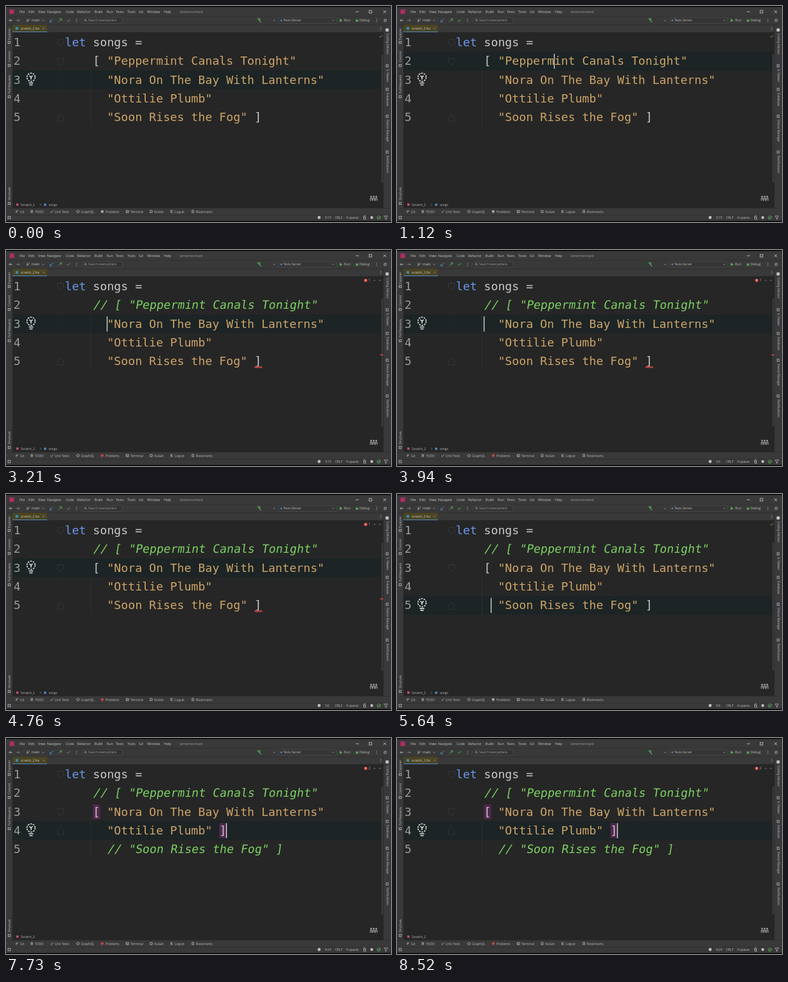
These frames come from a looping animation (600x338 px, 8560 ms). An HTML page:

```html
<!DOCTYPE html>
<html lang="en">
<head>
<meta charset="utf-8">
<title>Commenting out list items</title>
<style>
  html, body { margin: 0; width: 100%; height: 100%; overflow: hidden; background: #262626; }
  svg { display: block; width: 600px; height: 338px; }
  text { white-space: pre; font-family: "Open Sans", "Noto Sans", sans-serif; }
  .code { font-family: "DejaVu Sans Mono", "Noto Sans Mono", monospace; font-size: 18.17px; }
</style>
</head>
<body>
<svg viewBox="0 0 600 338"><g id="chrome"></g><g id="editor"></g></svg>
<script>
const LOOP = 8560, LEFT = 91.8, COL = 10.94, TOP = 42.4, ROW = 29.3;
const GREY = '#bcbcbc', DIM = '#8a8a8a', GREEN = '#57a65a', BLUE = '#4a88c7', RED = '#e04a46';
const PLAIN = '#c8c8c8', STRING = '#cda468', COMMENT = '#7bd162', KEYWORD = '#6c95eb';

const rect = (x, y, w, h, fill, more = '') =>
  `<rect x="${x}" y="${y}" width="${w}" height="${h}" fill="${fill}" ${more}/>`;
const dot = (x, y, r, fill) => `<circle cx="${x}" cy="${y}" r="${r}" fill="${fill}"/>`;
const ring = (x, y, r, color, width, more = '') =>
  `<circle cx="${x}" cy="${y}" r="${r}" fill="none" stroke="${color}" stroke-width="${width}" ${more}/>`;
const line = (d, color = GREY, width = .8, more = '') =>
  `<path d="${d}" fill="none" stroke="${color}" stroke-width="${width}" ${more}/>`;
const text = (x, y, s, size = 4.9, fill = GREY, more = '') =>
  `<text x="${x}" y="${y}" font-size="${size}" fill="${fill}" ${more}>${s}</text>`;
const frame = (x, y, color = GREY, s = 4) =>
  rect(x - s / 2, y - s / 2, s, s, 'none', `stroke="${color}" stroke-width=".8"`);
const chevron = (x, y, color = GREY) => line(`M${x - 1.5} ${y - .7}l1.5 1.5 1.5-1.5`, color, .6);
const check = (x, y, color = GREEN) => line(`M${x - 2} ${y}l1.5 1.7 3-3.6`, color, 1);
const dots = (x, y) => [-2, 0, 2].map(d => dot(x, y + d, .55, GREY)).join('');

const colX = c => LEFT + c * COL;
const rowY = r => TOP + (r - 1) * ROW;
const code = (r, c, s, fill, slant = 0) =>
  `<text class="code" fill="${fill}" transform="translate(${colX(c)} ${rowY(r) + 20.7}) skewX(${-slant})">${s}</text>`;
const squiggle = (r, c, w) => {
  let d = `M${colX(c)} ${rowY(r) + 25}`;
  for (let x = 0; x < w; x += 4) d += 'l2-2.4 2 2.4';
  return line(d, RED, 1.1);
};

function drawChrome() {
  const menu = [['File', 21], ['Edit', 35], ['View', 50], ['Navigate', 64], ['Code', 93], ['Refactor', 111],
    ['Build', 138], ['Run', 157], ['Tests', 171], ['Tools', 189], ['Git', 207], ['Window', 220], ['Help', 246]];
  // bottom tools: label, x, icon strokes around the icon centre
  const tools = [['Git', 22, 'm-1.2-2v4m2.4-4v1.4l-2.4 1.2'], ['TODO', 45, 'm-2-1.5h4m-4 1.5h4m-4 1.5h4'],
    ['Unit Tests', 76, 'm-2 0l1.5 1.7 3-3.6'], ['GraphQL', 117, 'm0-2l2 1v2l-2 1-2-1v-2z'], ['Problems', 155, ''],
    ['Terminal', 194, 'm-2-1.7h4v3.4h-4zm1 1l1 .8-1 .8'], ['NuGet', 231, 'm-1.7-1.7h3.4v3.4h-3.4z'],
    ['Logcat', 263, 'm-2-1.5h4m-4 1.5h2.5m-2.5 1.5h4'], ['Bookmarks', 296, 'm-1.3-2h2.6v4l-1.3-1-1.3 1z']];
  const left = [['Explorer', 53, 57], ['Commit', 88, 93], ['Pull Requests', 137, 142], ['Structure', 304, 309]];
  const right = [['Coding Advisor', 43], ['IL Viewer', 99], ['Database', 136], ['Device Manager', 178], ['Notifications', 234]];

  let s = rect(0, 0, 600, 338, '#393939') + rect(10, 41, 578, 275, '#262626');
  s += line('M0 16.2H600M0 29.3H600M0 316.5H600M0 327.5H600M10.3 29V316M588.3 29V316', '#2e2e2e', .7);
  s += rect(0, 0, 600, 1.4, '#000') + rect(0, 336.6, 600, 1.4, '#000');

  // title bar
  s += rect(5.5, 5.5, 7, 7, '#b52c67');
  s += menu.map(([m, x]) => text(x, 11.3, m, 5.3, '#cacaca')).join('');
  s += text(271, 11.3, 'lanternorchard', 5.1, '#a0a0a0');
  s += line('M545 9h5M588 6.8l4.4 4.4M592.4 6.8l-4.4 4.4', '#cfcfcf') + frame(568, 9, '#cfcfcf');

  // toolbar
  s += line('M10 22.5H5l2-2M5 22.5l2 2', GREY) + line('M16 22.5h5l-2-2M21 22.5l-2 2', DIM);
  s += line('M33 20v5M36 20v1.5q0 1.5-3 1.8') + text(40, 24.3, 'main', 5.3, '#c8c8c8') + chevron(58, 22.5);
  s += line('M73.5 20l-5 5M68.5 22v3h3', BLUE, 1) + line('M81.5 25l5-5M83.5 20h3v3', GREEN, 1);
  s += check(97, 22.5) + dots(110, 22.5);
  s += rect(119, 18, 62, 9, '#333', 'rx="1.5" stroke="#555" stroke-width=".6"');
  s += ring(123.5, 22, 1.5, GREY, .6) + line('M124.6 23.1l1.4 1.4', GREY, .6);
  s += text(128, 24.3, 'Search everywhere', 5, '#9a9a9a');
  s += line('M391.5 20.5l3-1 2 2M393.5 21l4 4.5', GREEN, 1.3) + chevron(418, 22.5);
  s += rect(425, 18, 90, 9, '#353535', 'rx="1.5" stroke="#555" stroke-width=".6"');
  s += dot(429, 22.5, 1.4, BLUE) + text(432, 24.3, 'Tests.Server', 5) + chevron(510, 22.5);
  s += `<path d="M520 20l4.5 2.6-4.5 2.6z" fill="${GREEN}"/>` + text(527, 24.3, 'Run', 5.2);
  s += dot(547, 22.8, 1.9, GREEN) + line('M544.5 21l5 3.6M549.5 21l-5 3.6', GREEN, .6) + text(551, 24.3, 'Debug', 5.2);
  s += dots(578, 22.5) + ring(591, 22.5, 1.8, GREY, 1.2, 'stroke-dasharray="1.2 .5"');

  // file tab
  s += rect(10, 29.5, 54, 11.5, '#4b4522') + rect(10, 40, 54, 1, BLUE);
  s += rect(15, 33, 4, 4, '#378bba') + text(23, 36.8, 'scratch_2.fsx', 4.9, '#d0cdbd');
  s += line('M57 33.5l3 3M60 33.5l-3 3', DIM, .6) + dots(584, 35);

  // side bars
  for (const [name, y, icon] of left)
    s += text(0, 0, name, 4.7, GREY, `transform="translate(7 ${y}) rotate(-90)"`) + frame(5, icon, GREY, 3.4);
  right.forEach(([name, y], i) => {
    s += text(0, 0, name, 4.7, GREY, `transform="translate(592.5 ${y}) rotate(90)"`);
    s += i ? frame(594, y - 5.5, GREY, 3.4) : dot(594, 37.5, 2.7, GREY);
  });

  // bottom bars
  s += rect(16, 309, 3.6, 3.6, '#b64f7e') + text(23, 312.8, 'Scratch_2', 4.9);
  for (const [name, x, icon] of tools)
    s += text(x, 323.5, name, 4.9) + line(`M${x - 4.8} 321.7${icon}`);
  s += frame(5, 331, GREY, 3.8) + dot(488, 331, 2.4, GREY);
  s += text(513, 332.8, 'CRLF', 4.9) + text(530, 332.8, '4 spaces', 4.9);
  s += frame(559, 331.8, GREY, 3.2) + line('M557.6 330v-1.4q1.4-1.4 2.8 0') + dot(570, 331, 2.2, GREY);
  s += ring(581, 331, 2.6, GREEN, .8) + check(581, 331);
  s += line('M589 328.5h6l-2.3 2.6v2.6h-1.4v-2.6z', GREY, .7);
  document.getElementById('chrome').innerHTML = s;
}

// [time, row, column]
const carets = [[0, 3, 14], [1000, 2, 14], [2100, 3, 14], [3200, 3, 6], [3600, 3, 5], [3880, 3, 4],
  [4250, 3, 5], [4900, 4, 5], [5300, 5, 5], [6300, 4, 5], [6550, 4, 21], [7200, 4, 22], [7500, 4, 23]];
const positions = [[0, '3:15'], [3400, '3:7'], [3750, '3:6'], [4050, '3:5'], [4450, '3:6'], [5100, '4:6'],
  [5500, '5:6'], [6450, '4:6'], [6750, '4:22'], [7400, '4:23'], [7700, '4:24']];
const bulbs = [[0, 3], [5500, 5], [6700, 4]];
const last = (list, t) => list.findLast(e => e[0] <= t);

function drawEditor(t) {
  const [moved, row, col] = last(carets, t);
  const firstError = t >= 2350 && t < 4800, secondError = t >= 6300;
  const squiggles = secondError && t < 7600, paired = t >= 7600;
  const shown = t >= 400 && (t - moved) % 1000 < 500;
  const commented = t >= 2100, bracket = t >= 4250, lastCommented = t >= 5900;

  let s = rect(10, rowY(row), 575, ROW, '#1c2425');
  s += line(`M85 ${TOP}V304`, '#303030', .7, 'stroke-dasharray="1 1.5"');
  s += line(`M132.3 ${rowY(bracket ? 4 : 3)}V${rowY(6)}`, '#373737', .7);
  const fold = (r, up) => line(`M80.3 ${rowY(r) + 10}h9.4v6l-4.7 4.7-4.7-4.7z`, '#3b3b3b', .8,
    up ? `transform="rotate(180 85 ${rowY(r) + 15.3})"` : '');
  s += fold(1) + fold(commented ? (bracket ? 3 : 1) : 2) + fold(lastCommented ? 4 : 5, true);
  s += rect(585, 76, 2.5, 200, '#3a3a3a');

  if (paired) s += [[3, 4], [4, 22]].map(([r, c]) => rect(colX(c), rowY(r) + 3, COL, 23, '#52284f')).join('');

  for (let r = 1; r <= 5; r++) s += `<text class="code" x="11.8" y="${rowY(r) + 20.7}" fill="#9b9b9b">${r}</text>`;
  s += code(1, 0, 'let', KEYWORD) + code(1, 4, 'songs =', PLAIN);
  const first = '"Peppermint Canals Tonight"', fourth = '"Soon Rises the Fog"';
  s += commented ? code(2, 4, '// [ ' + first, COMMENT, 9) : code(2, 4, '[', PLAIN) + code(2, 6, first, STRING);
  if (bracket) s += code(3, 4, '[', PLAIN);
  s += code(3, bracket && t < 4600 ? 7 : 6, '"Nora On The Bay With Lanterns"', STRING);
  s += code(4, 6, '"Ottilie Plumb"', STRING);
  if (t >= 7500) s += code(4, 22, ']', PLAIN);
  s += lastCommented ? code(5, 6, `// ${fourth} ]`, COMMENT, 9) : code(5, 6, fourth, STRING) + code(5, 27, ']', PLAIN);

  if (firstError) s += squiggle(5, 27, 11) + rect(583, 163.5, 5, 1.3, RED);
  if (squiggles) {
    s += squiggle(3, 4, 11) + squiggle(5, 0, 340);
    s += rect(583, 120, 5, 1.3, RED) + rect(583, 164, 5, 1.3, RED);
    if (t >= 6750) s += text(13, 332.8, "Incomplete structured construct at or before this point in expression. Expected ']' or other token.", 4.7);
  }
  if (shown) s += rect(colX(col) - .5, rowY(row) + 3, 1.3, 23.5, '#dcdcdc');

  // bulb
  const y = rowY(last(bulbs, t)[1]) + 10.5;
  s += ring(39, y, 6.4, '#dedede', 1.6, 'stroke-dasharray="2.6 1.4"');
  s += line(`M36.5 ${y - 2.5}l2.5 2.5 2.5-2.5M39 ${y}v3.5M35.5 ${y + 9}h7M36.5 ${y + 12}h5`, '#dedede', 1.6);

  // inspection summary
  const count = secondError && t >= 6500 ? 2 : firstError && t >= 2900 ? 1 : 0;
  if (count) {
    s += dot(560.5, 47.5, 2.6, RED) + line('M560.5 46v1.8M560.5 48.4v.6', '#fff', .7);
    s += text(565, 49.4, count, 5) + line('M573 48.3l1.5-1.5 1.5 1.5', GREY, .6) + chevron(582.5, 47.5);
  } else if (!commented || (t >= 4800 && !lastCommented)) s += check(584, 47.5);

  const bad = firstError || secondError;
  s += dot(150, 321.7, 2.1, bad ? RED : GREY) + line('M150 320.4v1.5M150 322.5v.6', '#333', .6);
  if (t < 6400) s += line('M53 309.3l1.6 1.7-1.6 1.7', DIM, .6) + dot(61, 311, 2, BLUE) + text(66.5, 312.8, 'songs', 4.9);
  s += text(497, 332.8, last(positions, t)[1], 4.9);

  for (const x of [569, 573, 577])
    s += dot(x, 298.3, 1.3, '#a9a9a9') + line(`M${x - 1.4} 305v-4.4h2.8v4.4M${x} 300.6v3`, '#a9a9a9', .8);
  return s;
}

drawChrome();
const editor = document.getElementById('editor');
let drawn = '';
function tick() {
  const s = drawEditor(performance.now() % LOOP);
  if (s !== drawn) editor.innerHTML = drawn = s;
  requestAnimationFrame(tick);
}
tick();
</script>
</body>
</html>
```
